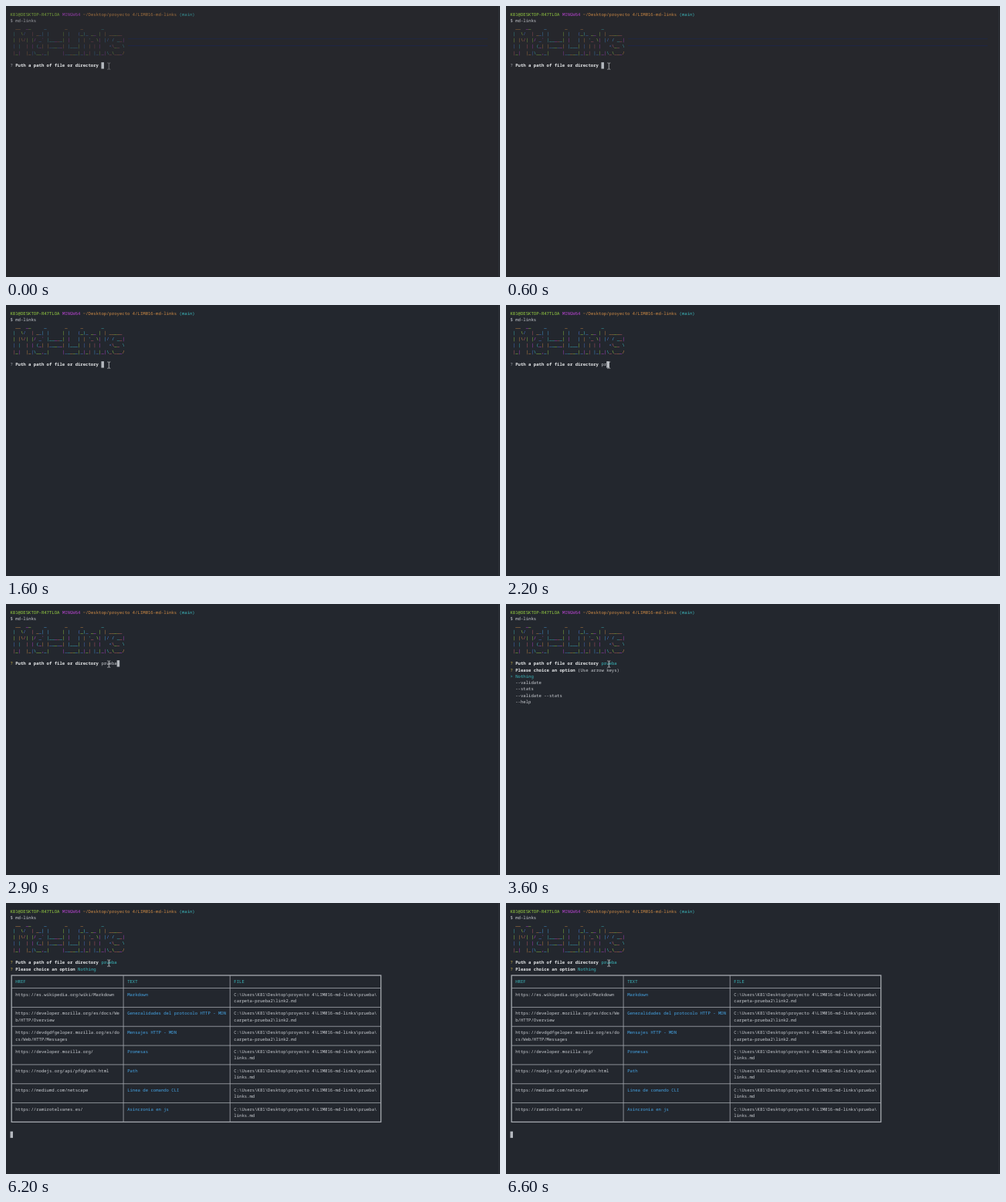
These frames come from a looping animation (640 px wide and 352 px high, 6800 ms). An HTML page:

```html
<!DOCTYPE html>
<html lang="en">
<head>
<meta charset="utf-8">
<title>md-links</title>
<style>
  html, body { margin: 0; width: 100%; height: 100%; overflow: hidden; background: #23272e; }
  svg { display: block; width: 640px; height: 352px; }
  text {
    font: 5.617px "Noto Sans Mono", "DejaVu Sans Mono", monospace;
    white-space: pre;
    text-rendering: geometricPrecision;
  }
  .bold { font-weight: 700; }
</style>
</head>
<body>
<svg id="stage" viewBox="0 0 640 352"></svg>
<script>
const LOOP = 6800;
const CW = 3.37, LH = 8.28, LEFT = 5.5, BASE = 13;
const C = {
  text: '#c9ccd1', white: '#e6e8ea', dim: '#a4a8ae', green: '#9bd443', magenta: '#bb45d4',
  orange: '#d08b45', cyan: '#3cb9bd', blue: '#45a3e3', yellow: '#cdb650', line: '#a6aab0'
};
const stage = document.getElementById('stage');

function add(parent, tag, attrs, content) {
  const el = document.createElementNS('http://www.w3.org/2000/svg', tag);
  for (const key in attrs) el.setAttribute(key, attrs[key]);
  if (content) el.textContent = content;
  parent.appendChild(el);
  return el;
}
const group = () => add(stage, 'g', {});
const colX = col => LEFT + col * CW;

function write(parent, row, col, str, fill = C.text, bold = false) {
  return add(parent, 'text', { x: colX(col), y: BASE + row * LH, fill, class: bold ? 'bold' : '' }, str);
}
function block(parent, row, col) {
  add(parent, 'rect', { x: colX(col), y: row * LH + 6.9, width: 3.5, height: 8.4, fill: '#b4b8be' });
}
function line(parent, x1, y1, x2, y2, stroke = C.line, width = 0.8) {
  add(parent, 'line', { x1, y1, x2, y2, stroke, 'stroke-width': width });
}

// Steps are [time, opacity] pairs; each value holds until the next.
function steps(el, list) {
  const frames = list.map(([t, opacity]) => ({ offset: t / LOOP, opacity, easing: 'step-end' }));
  frames.push({ offset: 1, opacity: list[list.length - 1][1] });
  el.animate(frames, { duration: LOOP, iterations: Infinity });
}
function during(el, from, to = LOOP) {
  const list = from ? [[0, 0], [from, 1]] : [[0, 1]];
  if (to < LOOP) list.push([to, 0]);
  steps(el, list);
}
function ramp(from, to, start, end, count = 7) {
  return [[0, from], ...Array.from({ length: count }, (_, i) =>
    [start + (end - start) * i / (count - 1), from + (to - from) * (i + 1) / count])];
}

// Background
add(stage, 'rect', { width: 640, height: 352, fill: '#23272e' });
const haze = add(stage, 'rect', { width: 640, height: 352, fill: '#26272c' });
steps(haze, ramp(1, 0, 800, 1400));
line(stage, 638.5, 0, 638.5, 352, '#2c3037', 1);

const streaks = group();
line(streaks, 158, 42.5, 624, 42.5, '#1f2740', 1);
line(streaks, 158, 51.5, 624, 51.5, '#1e2644', 1);
during(streaks, 0, 800);

// Shell prompt
const prompt = group();
write(prompt, 0, 0, 'K81@DESKTOP-R47TLOA', C.green);
write(prompt, 0, 20, 'MINGW64', C.magenta);
write(prompt, 0, 28, '~/Desktop/proyecto 4/LIM016-md-links', C.orange);
write(prompt, 0, 65, '(main)', C.cyan);
write(prompt, 1, 0, '$ md-links');
steps(prompt, ramp(0.72, 1, 100, 700));

// Banner in random colours
const banner = group();
const art = [
  '  __  __     _       _     _       _',
  ' |  \\/  | __| |     | |   (_)_ __ | | _____',
  " | |\\/| |/ _` |_____| |   | | '_ \\| |/ / __|",
  ' | |  | | (_| |_____| |___| | | | |   <\\__ \\',
  ' |_|  |_|\\__,_|     |_____|_|_| |_|_|\\_\\___/'
];
const inks = [C.orange, C.blue, C.magenta, C.green, C.cyan, '#4a78d8', '#c95f6c'];
let seed = 23;
const random = () => (seed = seed * 16807 % 2147483647) / 2147483647;
art.forEach((str, r) => [...str].forEach((ch, c) => {
  if (ch !== ' ') write(banner, r + 2, c, ch, inks[Math.floor(random() * inks.length)]);
}));
steps(banner, [...ramp(0.5, 0.8, 100, 700), [1500, 0.88], [1600, 0.94], [1800, 1]]);

// First question
write(stage, 8, 2, 'Puth a path of file or directory', C.white, true);
during(write(stage, 8, 0, '?', C.dim), 0, 2900);
during(write(stage, 8, 0, '?', C.yellow), 2900);

const typing = [[0, 0], [2000, 1], [2200, 2], [2300, 3], [2400, 4], [2600, 5], [2800, 6], [3500, 6]];
typing.slice(0, -1).forEach(([from, n], i) => {
  const g = group();
  write(g, 8, 35, 'prueba'.slice(0, n));
  if (n !== 1) block(g, 8, 35 + n);
  during(g, from, typing[i + 1][0]);
});
during(write(stage, 8, 35, 'prueba', C.cyan), 3500);

// Second question
const question = group();
write(question, 9, 0, '?', C.yellow);
write(question, 9, 2, 'Please choice an option', C.white, true);
during(question, 3500);

const menu = group();
write(menu, 9, 26, '(Use arrow keys)');
write(menu, 10, 0, '> Nothing', C.cyan);
['--validate', '--stats', '--validate --stats', '--help'].forEach((s, i) => write(menu, 11 + i, 2, s));
during(menu, 3500, 4900);

during(write(stage, 9, 26, 'Nothing', C.cyan), 4900);
const waiting = group();
block(waiting, 10, 0);
during(waiting, 4900, 6200);

// Result table
const table = group();
const folder = 'C:\\Users\\K81\\Desktop\\proyecto 4\\LIM016-md-links\\prueba\\';
const nested = 'carpeta-prueba2\\link2.md';
const rows = [
  ['https://es.wikipedia.org/wiki/Markdown', 'Markdown', nested],
  ['https://developer.mozilla.org/es/docs/Web/HTTP/Overview', 'Generalidades del protocolo HTTP - MDN', nested],
  ['https://devdgdfgeloper.mozilla.org/es/docs/Web/HTTP/Messages', 'Mensajes HTTP - MDN', nested],
  ['https://developer.mozilla.org/', 'Promesas', 'links.md'],
  ['https://nodejs.org/api/pfdghath.html', 'Path', 'links.md'],
  ['https://mediumd.com/netscape', 'Linea de comando CLI', 'links.md'],
  ['https://ramirotelvanes.es/', 'Asincronia en js', 'links.md']
];
const midX = col => colX(col + 0.5);
const midY = row => 11.2 + row * LH;
const [x0, x1, y0, y1] = [midX(0), midX(142), midY(10), midY(33)];
add(table, 'rect', { x: x0, y: y0, width: x1 - x0, height: y1 - y0, fill: 'none', stroke: C.line, 'stroke-width': 1.3 });
[43, 84].forEach(col => line(table, midX(col), y0, midX(col), y1));
['HREF', 'TEXT', 'FILE'].forEach((s, i) => write(table, 11, [2, 45, 86][i], s, C.cyan));
rows.forEach(([href, label, file], i) => {
  const row = 13 + i * 3;
  line(table, x0, midY(row - 1), x1, midY(row - 1));
  write(table, row, 2, href.slice(0, 40));
  write(table, row + 1, 2, href.slice(40));
  write(table, row, 45, label, C.blue);
  write(table, row, 86, folder);
  write(table, row + 1, 86, file);
});
block(table, 35, 0);
during(table, 6200);

// Mouse pointer
const beam = add(stage, 'path', {
  d: 'M131.4 74h1.2l.7.6.7-.6h1.2M133.3 74.6v7M131.4 82.2h1.2l.7-.6.7.6h1.2',
  fill: 'none', stroke: '#d5d7da', 'stroke-width': 0.8
});
steps(beam, ramp(0.5, 1, 100, 700));
</script>
</body>
</html>
```
